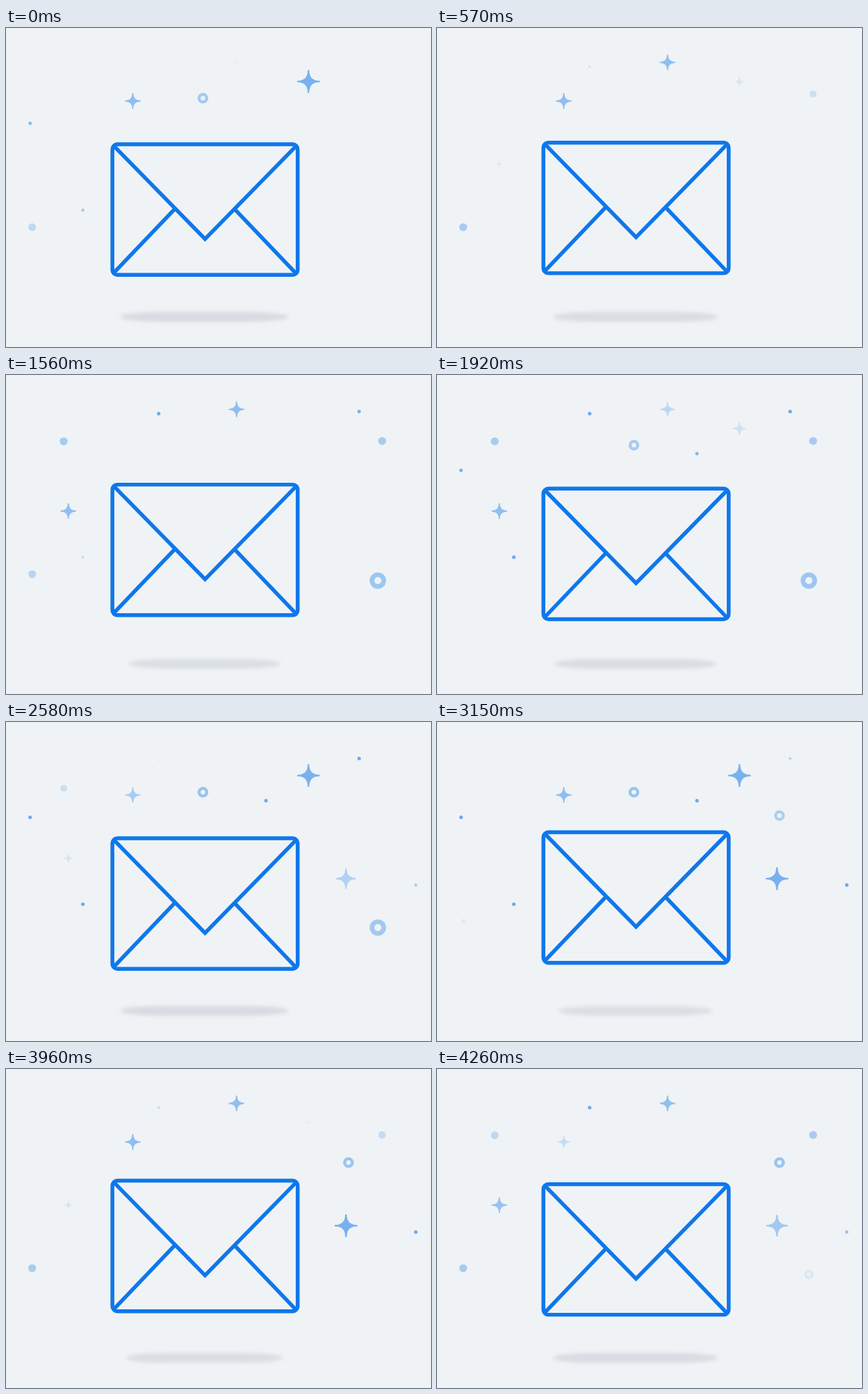
These frames come from a looping animation (600x450 px, 4.29 s). An HTML page with a canvas:

```html
<!DOCTYPE html>
<html lang="en">
<head>
<meta charset="utf-8">
<title>Floating envelope</title>
<style>
  html, body { margin: 0; height: 100%; overflow: hidden; background: #eff3f5; }
  canvas { display: block; filter: blur(.5px); }
</style>
</head>
<body>
<canvas id="stage" width="600" height="450"></canvas>
<script>
const ctx = document.getElementById('stage').getContext('2d');
const LOOP = 4290, STEP = 30, BOB = 2200;
const FADE = 450, LIFE = 1750, REST = 1600;
const BLUE = '#0f77eb', SPARK = '#2481ea';

// Sparks of one kind share shape, radius and opacity; each has a place and a first birth time.
const kinds = [
  { shape: dot, r: 2.5, alpha: .65, sparks: [
    [34, 134.5, -1850], [108.5, 257, -1950], [215.5, 54.5, 450],
    [578.5, 230, 2350], [367, 111, 1550], [498.5, 51.5, 1150]] },
  { shape: dot, r: 5.6, alpha: .35, sparks: [
    [37, 281, -300], [81.5, 93.5, 600], [531, 93, 350]] },
  { shape: ring, r: 7.6, alpha: .42, sparks: [[278, 99, -1800], [483.5, 132, 2800]] },
  { shape: ring, r: 11.6, alpha: .4, sparks: [[525, 290, 800]] },
  { shape: star, r: 11, alpha: .47, sparks: [
    [179, 103, -1100], [325.5, 48.5, -40], [88, 192, 500]] },
  { shape: star, r: 16, alpha: .58, sparks: [[427, 75.5, -1550], [480, 221, 2350]] }
];

const clamp = v => Math.max(0, Math.min(1, v));

function dot(r) {
  ctx.arc(0, 0, r, 0, 2 * Math.PI);
}

function ring(r) {
  ctx.arc(0, 0, r, 0, 2 * Math.PI);
  ctx.arc(0, 0, r * .43, 0, 2 * Math.PI, true);
}

function star(r) {
  const tip = r * .07, waist = r * .06;
  for (let i = 0; i < 4; i++) {
    ctx.lineTo(tip, -r);
    ctx.quadraticCurveTo(waist, -waist, r, -tip);
    ctx.rotate(Math.PI / 2);
  }
}

// Fade in, stay, fade out and rest, over and over from the first birth.
function visibility(t, born) {
  if (t < born) return 0;
  const age = (t - born) % (LIFE + REST);
  return clamp(age / FADE) - clamp((age - LIFE) / FADE);
}

function drawKind(t, { shape, r, alpha, sparks }) {
  for (const [x, y, born] of sparks) {
    const level = visibility(t, born);
    ctx.save();
    ctx.translate(x, y);
    ctx.globalAlpha = alpha * level;
    ctx.fillStyle = SPARK;
    ctx.beginPath();
    shape(r * (1 - (1 - level) ** 3));
    ctx.fill();
    ctx.restore();
  }
}

function drawShadow(bob) {
  const half = 112.5 + 7.3 * bob;
  ctx.save();
  ctx.filter = 'blur(2.5px)';
  ctx.globalAlpha = .9 + .1 * bob;
  ctx.fillStyle = '#d8dbe1';
  ctx.beginPath();
  ctx.roundRect(280 - half, 400.5, 2 * half, 14, { x: 60, y: 7 });
  ctx.fill();
  ctx.restore();
}

function drawEnvelope(bob) {
  ctx.save();
  ctx.translate(281, 158.9 + 6 * bob);
  ctx.strokeStyle = BLUE;
  ctx.lineWidth = 5.4;
  ctx.beginPath();
  ctx.roundRect(-130.8, 0, 261.6, 184.2, 7);
  ctx.moveTo(-128, 3);
  ctx.lineTo(0, 133.5);
  ctx.lineTo(128, 3);
  for (const side of [-1, 1]) {
    ctx.moveTo(side * 42 - .6, 91);
    ctx.lineTo(side * 128 - .6, 181);
  }
  ctx.stroke();
  ctx.restore();
}

function frame() {
  const t = Math.floor(performance.now() % LOOP / STEP) * STEP;
  const bob = Math.cos(2 * Math.PI * (t - 190) / BOB);
  ctx.fillStyle = '#eff3f5';
  ctx.fillRect(0, 0, 600, 450);
  drawShadow(bob);
  kinds.forEach(kind => drawKind(t, kind));
  drawEnvelope(bob);
  requestAnimationFrame(frame);
}
frame();
</script>
</body>
</html>
```
